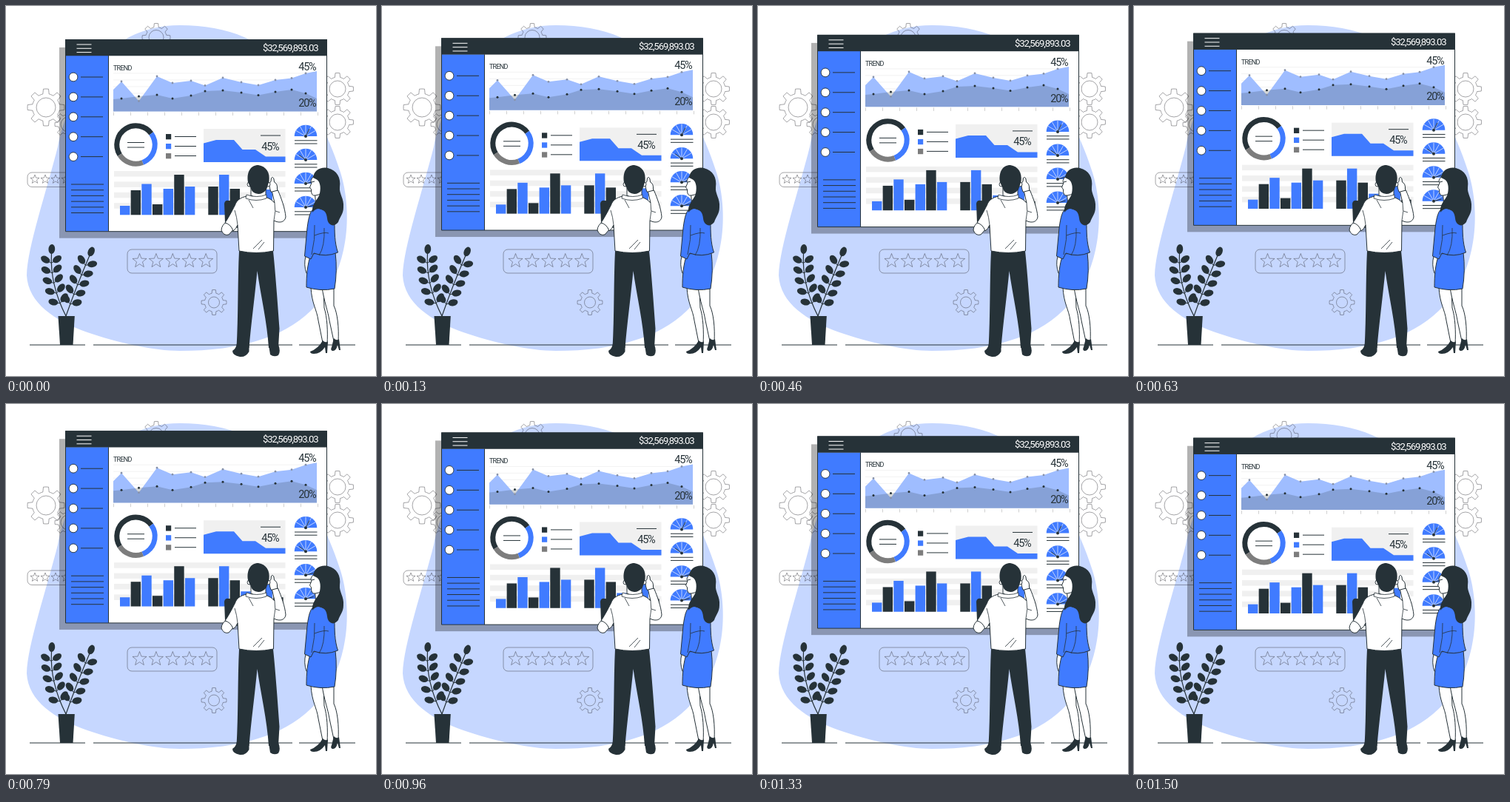
Recreate the animation shown at these times as an HTML page with a canvas. Size 500 px wide and 500 px high, loop 1.54 s.

```html
<!DOCTYPE html>
<html lang="en">
<head>
<meta charset="utf-8">
<title>Dashboard</title>
<style>
html, body { margin: 0; width: 100%; height: 100%; overflow: hidden; background: #fff; }
canvas { display: block; width: 500px; height: 500px; }
</style>
</head>
<body>
<canvas id="stage" width="500" height="500"></canvas>
<script>
const ctx = document.getElementById('stage').getContext('2d');
const BLUE = '#407bff', DARK = '#263238', GREY = '#7d7d7d', PALE = '#f0f0f0', WHITE = '#fff';
const THIN = 'rgba(55,55,60,.5)';
const LOOP = 1540, STEP = 125 / 3;

function rect(x0, y0, x1, y1, color) {
  ctx.fillStyle = color;
  ctx.fillRect(x0, y0, x1 - x0, y1 - y0);
}

function line(x0, y0, x1, y1, color = DARK, width = 1) {
  ctx.strokeStyle = color;
  ctx.lineWidth = width;
  ctx.beginPath();
  ctx.moveTo(x0, y0);
  ctx.lineTo(x1, y1);
  ctx.stroke();
}

function disc(x, y, r, fill, stroke, width = 1) {
  ctx.beginPath();
  ctx.arc(x, y, r, 0, 7);
  paint(undefined, fill, stroke, width);
}

function paint(path, fill, stroke, width = 1) {
  const target = path ? [path] : [];
  if (fill) { ctx.fillStyle = fill; ctx.fill(...target); }
  if (stroke) { ctx.strokeStyle = stroke; ctx.lineWidth = width; ctx.stroke(...target); }
}

const shape = (d, fill, stroke, width) => paint(new Path2D(d), fill, stroke, width);

function polygon(points, fill) {
  ctx.beginPath();
  points.forEach(([x, y]) => ctx.lineTo(x, y));
  paint(undefined, fill);
}

function text(str, x, y, size, color = DARK, align = 'left') {
  ctx.font = `${size}px Roboto, "Liberation Sans", sans-serif`;
  ctx.letterSpacing = `${-0.085 * size}px`;
  ctx.textAlign = align;
  ctx.fillStyle = color;
  ctx.fillText(str, x, y);
}

function gear(x, y, r, hole) {
  const root = r * 0.74;
  ctx.beginPath();
  for (let i = 0; i < 8; i++) {
    const a = i * Math.PI / 4;
    ctx.arc(x, y, root, a - 0.48, a - 0.23);
    ctx.arc(x, y, r, a - 0.14, a + 0.14);
    ctx.arc(x, y, root, a + 0.23, a + 0.305);
  }
  ctx.closePath();
  paint(undefined, null, THIN, 0.9);
  disc(x, y, hole, null, THIN, 0.9);
}

function star(x, y, r) {
  ctx.beginPath();
  for (let i = 0; i < 10; i++) {
    const a = i * Math.PI / 5 - Math.PI / 2, d = i % 2 ? r * 0.42 : r;
    ctx.lineTo(x + d * Math.cos(a), y + d * Math.sin(a));
  }
  ctx.closePath();
  paint(undefined, null, THIN, 0.9);
}

function rating(x, y, w, h, first, gap, r) {
  ctx.beginPath();
  ctx.roundRect(x, y, w, h, 6);
  paint(undefined, null, THIN, 0.9);
  for (let i = 0; i < 5; i++) star(first + i * gap, y + h / 2 - 0.5, r);
}

function backdrop() {
  rect(0, 0, 500, 500, WHITE);
  shape('M235 26C300 26 352 46 387 95C420 140 441 190 452 225C463 260 463 300 456 330' +
    'C443 390 405 430 350 449C312 462 275 466 235 466C200 466 150 455 110 441' +
    'C66 425 30 402 28 364C29 325 55 250 70 190C85 120 130 26 235 26Z', '#c6d7ff');
  gear(54, 137, 25, 13);
  gear(84, 160, 18, 10);
  gear(203, 42.5, 19, 10);
  gear(448, 112, 21.5, 11);
  gear(448, 157, 21.5, 11);
  gear(281, 400.5, 17, 7.5);
  rating(164, 329, 121, 32, 180.5, 22.4, 10);
  rating(29, 225, 77, 19.5, 39, 14, 6.3);
  line(32, 458, 107, 458);
  line(118, 458, 387, 458);
  line(396, 458, 472, 458);
}

const trendX = [145, 156, 179.5, 204, 225, 250, 269, 293, 318, 341, 364, 386, 405, 420];
const upper = [113, 102, 128.5, 95, 104, 101, 107.5, 97, 103, 107, 100, 97.5, 91, 88];
const lower = [126, 125, 122, 120, 125, 121, 115, 114, 117, 120.5, 116, 113, 118, 125];

function trend() {
  text('TREND', 145, 87, 9);
  for (let y = 91; y < 142; y += 9) line(145, y, 420, y, '#ececec', 0.7);
  const area = (ys, fill) =>
    polygon([[145, 142.4], ...ys.map((y, i) => [trendX[i], y]), [420, 142.4]], fill);
  area(upper, '#9fbdff');
  area(lower, 'rgba(38,50,56,.2)');
  for (let i = 1; i < 13; i++) {
    disc(trendX[i], upper[i], 1.4, '#8792aa');
    disc(trendX[i], lower[i], 1.5, DARK);
  }
  for (let i = 0; i < 13; i++) line(145.5 + i * 23, 143.5, 145.5 + i * 23, 148, '#c4c4c4', 0.8);
  text('45%', 418.5, 87, 14.5, DARK, 'right');
  text('20%', 418.5, 135.7, 14.5, DARK, 'right');
}

function ring() {
  const arc = (from, to, color) => {
    ctx.beginPath();
    ctx.arc(175.5, 187.5, 25.7, from * Math.PI / 180, to * Math.PI / 180);
    paint(undefined, null, color, 7);
  };
  arc(148, 324, DARK);
  arc(-36, 69, BLUE);
  arc(69, 148, GREY);
  line(164, 184.5, 187, 184.5);
  line(164, 191, 187, 191);
  [DARK, BLUE, GREY].forEach((color, i) => {
    rect(216, 173 + i * 13, 223.2, 180.3 + i * 13, color);
    line(228, 176.5 + i * 13, 257, 176.5 + i * 13);
  });
}

function card() {
  rect(267, 166, 377.5, 211, PALE);
  shape('M267 185.5L284 181H308L319.5 194H337L351 203.5H377.5V211H267Z', BLUE);
  line(344, 175, 371, 175);
  text('45%', 368.5, 194.5, 14.5, DARK, 'right');
}

function gauge(y, needle) {
  ctx.beginPath();
  ctx.arc(405, y, 15.3, Math.PI, 0);
  ctx.closePath();
  paint(undefined, BLUE);
  for (let i = 1; i < 6; i++) {
    const a = -i * Math.PI / 6;
    line(405, y, 405 + 15 * Math.cos(a), y + 15 * Math.sin(a), '#cfdcff', 0.9);
  }
  line(405, y, 405 + 11 * Math.cos(needle), y + 11 * Math.sin(needle));
  disc(405, y, 2, DARK);
  line(390, y + 5.8, 420.5, y + 5.8);
  line(390, y + 10, 420.5, y + 10);
}

function bars() {
  for (let i = 0; i < 4; i++) rect(146, 223 + i * 14.4, 377.5, 230.5 + i * 14.4, PALE);
  const group = (x, tops, colors) =>
    tops.forEach((top, i) => rect(x + i * 14.65, top, x + 13.4 + i * 14.65, 282.3, colors[i % 2]));
  group(154, [270, 249, 240.5, 268, 247, 228, 244], [BLUE, DARK]);
  group(273.3, [244, 228, 247, 262, 255, 248, 270], [DARK, BLUE]);
}

function panel(dy) {
  ctx.save();
  ctx.translate(0, dy);
  rect(72, 56, 426, 313.7, 'rgba(0,0,0,.3)');
  rect(80.5, 45.5, 433.5, 304.7, WHITE);
  rect(80.5, 67, 138.5, 304.7, BLUE);
  line(138.5, 67, 138.5, 304.7);
  ctx.strokeRect(80.5, 45.5, 353, 259.2);
  rect(80, 45, 434, 67.3, DARK);
  for (let i = 0; i < 3; i++) line(95.5, 52 + i * 5.3, 115.5, 52 + i * 5.3, WHITE);
  text('$32,569,893.03', 421.5, 61, 13.2, WHITE, 'right');
  for (let i = 0; i < 5; i++) {
    const y = 96 + i * 26.9;
    disc(91, y, 5.9, WHITE, DARK, 0.9);
    line(101, y, 131, y);
  }
  for (let i = 0; i < 6; i++) line(88, 241 + i * 7.7, 132, 241 + i * 7.7);
  trend();
  ring();
  card();
  [-1.1, -2.5, -0.25, -0.25].forEach((needle, i) => gauge(176 + i * 32, needle));
  bars();
  ctx.restore();
}

function leaf(x, y, angle, distance) {
  const cx = x + distance * Math.cos(angle), cy = y + distance * Math.sin(angle);
  ctx.beginPath();
  ctx.ellipse(cx, cy, 6.6, 4.4, angle, 0, 7);
  paint(undefined, DARK);
  line(x, y, cx, cy);
}

function stem(x0, y0, cx, cy, x1, y1) {
  shape(`M${x0} ${y0}Q${cx} ${cy} ${x1} ${y1}`, null, DARK, 1.2);
  const mix = (a, b, c, t) => (1 - t) ** 2 * a + 2 * t * (1 - t) * b + t * t * c;
  const slope = t => Math.atan2((1 - t) * (cy - y0) + t * (y1 - cy), (1 - t) * (cx - x0) + t * (x1 - cx));
  for (let i = 0; i < 5; i++) {
    const t = 0.2 + i * 0.16, a = slope(t), x = mix(x0, cx, x1, t), y = mix(y0, cy, y1, t);
    leaf(x, y, a - 1, 9.4);
    leaf(x, y, a + 1, 9.4);
  }
  leaf(x1, y1, slope(1), 5.5);
}

function plant() {
  stem(81, 419, 59, 376, 61.5, 334);
  stem(81, 419, 95, 379, 113, 337);
  shape('M70.5 419H92.8L90.5 458H73Z', DARK);
}

function man() {
  shape('M295 267Q296 262 301 263L313 264V300L296 293Z', DARK);
  shape('M315 331H361C364 360 367 400 369.5 436L368 462H355C353 428 344 390 339.5 358' +
    'C336 395 331 430 328.5 462H311.5C314 420 313 370 315 331Z', DARK);
  shape('M312 456H328.5V467Q324 475 316 474Q306 472 306 466Q311 463 312 456Z', DARK);
  shape('M355 458H368.2Q371.5 467 368 472Q362 475 357 471Z', DARK);
  // Raised hand, then both arms and shirt
  shape('M358 251C356 246 355 240 358 237L358.5 232.5Q361 230 362 234L362.5 238Q367 240 366.5 247L367 253Z',
    WHITE, DARK);
  shape('M300 290Q291 296 291 303Q294 311 301 309L309 300Z', WHITE, DARK);
  shape('M325 257C317 259 312 262 309.5 269C305 278 300 287 296 293Q304 295 307 304Q311 301 313 296' +
    'L315 331Q338 336 361.5 331L362 290C370 294 377 292 378 285C377 273 372 260 367.5 249' +
    'L359.5 251L363 266Q359 261 351 258Z', WHITE, DARK);
  shape('M309 276Q312 285 313 296M363 266Q365 277 362 290M334 328L346 316M341 329L349 319' +
    'M364 277L370 279M328 262L334 273', null, DARK, 0.8);
  shape('M331 246V256Q340 262 351 256V246Z', WHITE, DARK);
  shape('M325 255Q339 260 352 255V260Q338 265 324 260Z', WHITE, DARK, 0.8);
  disc(329, 241, 3, WHITE, DARK, 0.9);
  disc(354, 241, 3, WHITE, DARK, 0.9);
  shape('M327 238C325 225 330 215 341 215C352 217 357 225 355.5 237L352 248' +
    'Q347 254 341 254Q333 253 331 247Z', DARK);
}

function woman() {
  // Legs and shoes
  shape('M412 380C413 402 420 410 422 425L428 455L434 457C435 440 434 420 430 408L429 380Z', WHITE, DARK);
  shape('M427 380C430 400 435 412 437 425L443 453L449 453C450 435 448 415 443 405L443 380Z', WHITE, DARK);
  shape('M428 452Q432 456 435 453L434 469H432L431 461Q425 470 416 470Q411 470 411 467Q422 463 428 452Z', DARK);
  shape('M443 449Q447 453 450 450L452 465H450L448 458Q446 467 441 466Q438 465 440 461Z', DARK);
  // Hand, skirt and jacket
  shape('M405 338Q402 350 406 361Q410 364 410 356L413 345L412 338Z', WHITE, DARK);
  shape('M412 335C407 350 406 365 406 380Q425 386 444 382Q448 358 445 333Z', BLUE, DARK);
  shape('M419 272C411 275 409 285 407 300L403.5 338L412 342L416 334Q432 340 448.5 333' +
    'C444 320 444 305 444 291L438 273Z', BLUE, DARK);
  shape('M417 296Q418 315 413 336M417 310Q430 305 436 307M423 337Q431 325 430 300', null, DARK, 0.8);
  // Head
  shape('M417 248L419 272L430 276L432 250Z', WHITE, DARK);
  shape('M416 230Q410 236 413 239L410.5 245Q412 247 412.5 248Q412 257 418 256Q428 255 430 245L428 228Z',
    WHITE, DARK);
  shape('M413 238L417 237', null, DARK);
  shape('M415 232C416 222 425 217 435 219C447 222 453 232 451 245C450 254 457 260 456 272' +
    'C456 281 451 285 449 292Q443 299 438 295C432 291 436 283 430 277Q421 270 414 279' +
    'C413 266 422 262 424 253C426 244 424 236 419 234Z', DARK);
}

function draw(now) {
  const frame = Math.min(36, Math.floor((now % LOOP + 5) / STEP));
  const t = frame * STEP;
  backdrop();
  panel(Math.max(-t, t - 1450) / 75);
  plant();
  man();
  woman();
}

ctx.lineJoin = 'round';
const start = performance.now();
function tick() {
  draw(performance.now() - start);
  requestAnimationFrame(tick);
}
tick();
</script>
</body>
</html>
```
